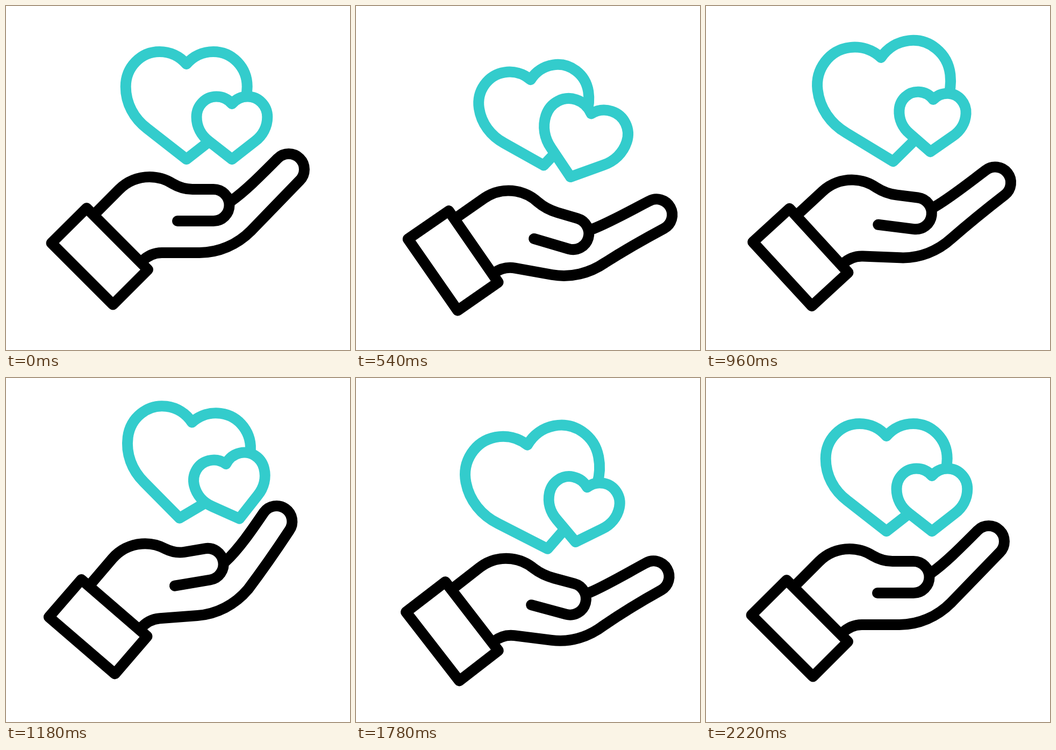
An HTML page with a canvas that plays this animation: 640x640 px, repeating every 2.4 s.

```html
<!DOCTYPE html>
<html lang="en">
<head>
<meta charset="utf-8">
<title>Hand and hearts</title>
<style>
  html, body { margin: 0; width: 100%; height: 100%; overflow: hidden; background: #fff; }
  canvas { display: block; width: 640px; height: 640px; }
</style>
</head>
<body>
<canvas id="stage" width="640" height="640"></canvas>
<script>
const ctx = document.getElementById('stage').getContext('2d');
const LOOP = 2400;
const SETTLED = 2220;

const clamp = u => Math.min(1, Math.max(0, u));
const ease = u => u * u * (3 - 2 * u);

// Eases from rest through a few [time, value] peaks and back to rest.
function swing(rest, start, ...peaks) {
  const keys = [[start, rest], ...peaks, [SETTLED, rest]];
  return t => keys.slice(1).reduce((value, [time, next], i) => {
    const [from, previous] = keys[i];
    return value + (next - previous) * ease(clamp((t - from) / (time - from)));
  }, rest);
}

const armAngle = swing(0, 200, [670, 12.5], [1180, -4.3], [1700, 7.7]);
const bendAngle = swing(0, 200, [760, 9.4], [1420, -11.5], [1800, 8]);

const bigY = swing(187, 200, [670, 213], [1180, 162], [1700, 212.5]);
const bigScale = swing(1, 100, [650, 0.9], [970, 1.1], [1440, 0.9], [1780, 1.112]);

const smallY = swing(228, 120, [560, 253], [1160, 205], [1600, 254]);
const smallAngle = swing(0, 120, [680, 21.5], [1240, -15], [1760, 12]);
const smallScale = swing(0.583, 0, [560, 0.7], [960, 0.55], [1440, 0.645], [1800, 0.587]);

// Turns and scales an offset around a centre.
function around(cx, cy, degrees, scale = 1) {
  const angle = degrees * Math.PI / 180;
  const c = Math.cos(angle) * scale, s = Math.sin(angle) * scale;
  return (dx, dy) => [cx + dx * c - dy * s, cy + dx * s + dy * c];
}

const turn = (cx, cy, degrees) => (x, y) => around(cx, cy, degrees)(x - cx, y - cy);

const move = p => ctx.moveTo(...p);
const line = p => ctx.lineTo(...p);
const curve = (a, b, p) => ctx.bezierCurveTo(...a, ...b, ...p);

function drawHeart(x, y, degrees, scale) {
  const place = around(x, y, degrees, scale);
  ctx.beginPath();
  for (const side of [-1, 1]) {
    const at = (dx, dy) => place(side * dx, dy);
    move(at(0, -79));
    curve(at(13, -94), at(31, -102), at(50, -102));
    curve(at(85, -102), at(113, -73), at(113, -37));
    curve(at(113, -6), at(98, 22), at(73, 41));
    line(at(0, 98));
  }
  ctx.fill();
  ctx.stroke();
}

function drawHand(t) {
  const bend = bendAngle(t);
  const arm = turn(132.5, 505.5, armAngle(t));
  const bentThumb = turn(327, 364, bend);
  const thumb = (x, y) => arm(...bentThumb(x, y));
  // The bend grows steadily from the palm towards the fingertips.
  const finger = (x, y) => {
    const share = clamp((x - y + 70) / 270);
    return arm(...turn(430, 363, bend * share)(x, y));
  };

  ctx.beginPath();

  // Sleeve
  move(arm(150, 376));
  line(arm(84.5, 441));
  line(arm(199, 555.5));
  line(arm(264, 490.5));
  ctx.closePath();

  // Back of the hand and thumb
  move(arm(165, 387));
  line(arm(210.4, 341.4));
  curve(arm(225.4, 326.4), arm(245.8, 318), arm(267, 318));
  curve(arm(282.2, 318), arm(297.2, 322.3), arm(310, 330.5));
  curve(arm(322, 337.5), thumb(334, 341), thumb(347, 341));
  line(thumb(386, 341));
  curve(thumb(402.3, 341), thumb(415.5, 354.2), thumb(415.5, 370.5));
  curve(thumb(415.5, 386.8), thumb(402.3, 400), thumb(386, 400));
  line(thumb(319, 400));

  // Palm and fingers
  move(arm(253, 475));
  curve(arm(263, 465), arm(276, 459), arm(290, 459));
  line(arm(360, 459));
  curve(finger(396, 459), finger(430, 444), finger(455.5, 418.5));
  curve(finger(486, 387), finger(516, 356), finger(546.5, 324.5));
  curve(finger(557.8, 313.2), finger(557.8, 294.8), finger(546.5, 283.5));
  curve(finger(535.2, 272.2), finger(516.8, 272.2), finger(505.5, 283.5));
  curve(finger(478, 311), finger(448, 342), finger(420, 362));

  ctx.stroke();
}

function draw() {
  const t = performance.now() % LOOP;
  ctx.fillStyle = '#fff';
  ctx.fillRect(0, 0, 640, 640);
  ctx.lineWidth = 20;
  ctx.lineCap = ctx.lineJoin = 'round';

  ctx.strokeStyle = '#33cccc';
  drawHeart(335.7, bigY(t), -1.4 * bendAngle(t), bigScale(t));
  drawHeart(420.4, smallY(t), smallAngle(t), smallScale(t));

  ctx.strokeStyle = '#000';
  drawHand(t);
  requestAnimationFrame(draw);
}
draw();
</script>
</body>
</html>
```
